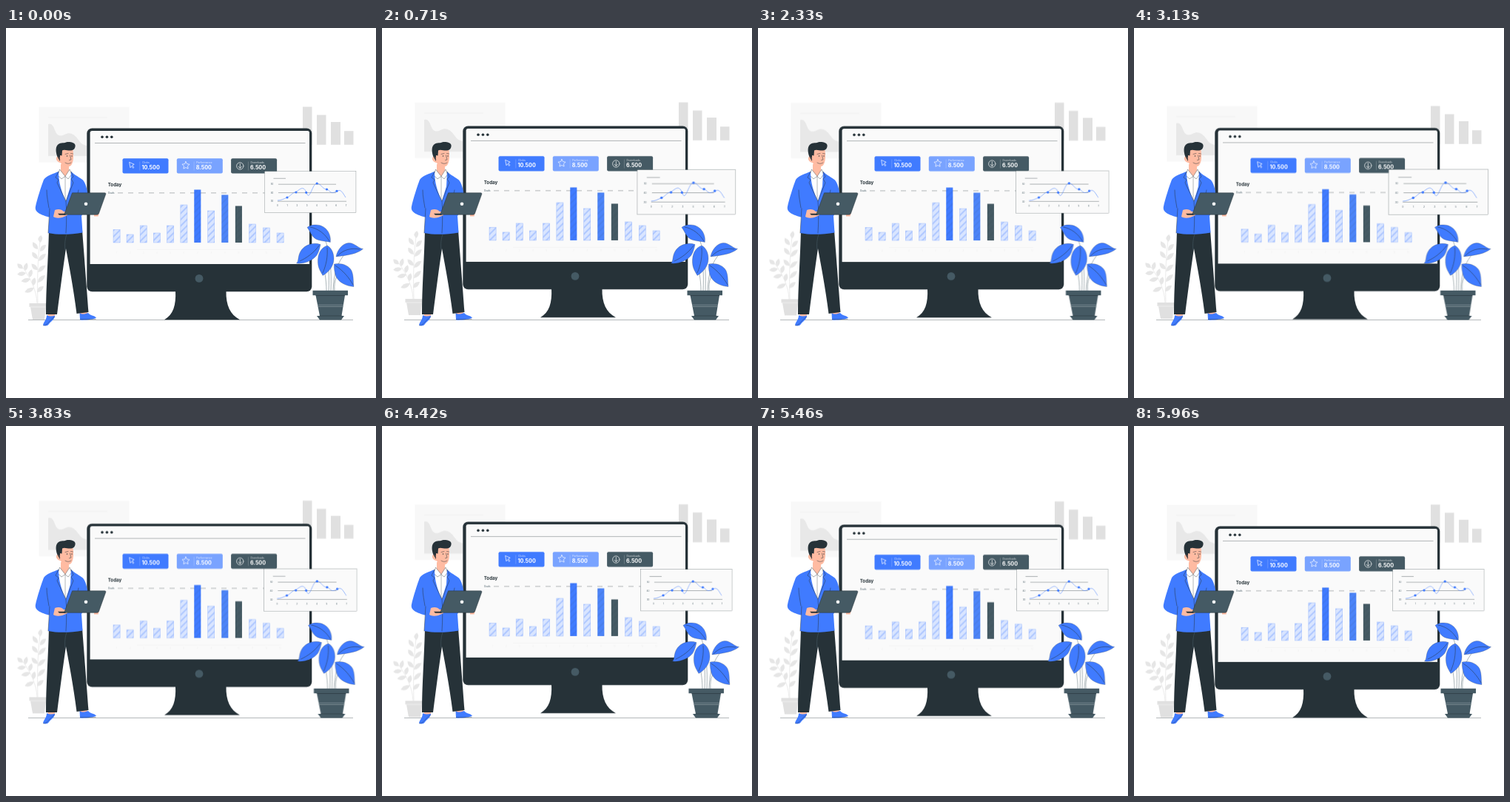
An HTML page for the animation above (6 s loop, 500 by 500 pixels).

```html
<!DOCTYPE html>
<html lang="en">
<head>
<meta charset="utf-8">
<title>Dashboard illustration</title>
<style>
html, body { margin: 0; width: 100%; height: 100%; overflow: hidden; background: #fff; }
svg { display: block; width: 100%; height: 100%; font-family: Inter, "Open Sans", sans-serif; }
.back { animation: rise 1.5s linear infinite; --lift: -6.3px; }
.monitor { animation: rise 3s linear infinite; --lift: -6.5px; }
.panel { animation: beat 1.5s infinite; transform-origin: 411.2px 221.7px; }
.plant { animation: shake 1.5s infinite; }
@keyframes rise { 50% { transform: translateY(var(--lift)); } }
@keyframes beat {
  0%, 40% { transform: scale(1); animation-timing-function: linear; }
  10%, 50% { transform: scale(1.1); animation-timing-function: ease; }
  30%, 60%, 100% { transform: scale(1); }
}
@keyframes shake {
  0%, 100% { transform: translateX(0); }
  10%, 90% { transform: translateX(-.55px); }
  20%, 80% { transform: translateX(1.1px); }
  30%, 50%, 70% { transform: translateX(-2.2px); }
  40%, 60% { transform: translateX(2.2px); }
}
.ink { fill: #263238; }
.slate { fill: #455a64; }
.blue { fill: #407bff; }
.skin { fill: #ffbba2; }
.line { fill: none; stroke: #263238; stroke-width: .5; stroke-linecap: round; stroke-linejoin: round; }
.thin { fill: none; stroke: #263238; stroke-width: .35; }
.white { fill: none; stroke: #fff; stroke-width: .7; stroke-linejoin: round; stroke-linecap: round; }
.num { font-weight: 700; font-size: 7.2px; fill: #fff; }
.tag { font-size: 3.5px; fill: #fff; fill-opacity: .8; }
</style>
</head>
<body>
<svg viewBox="0 0 500 500">
  <defs>
    <pattern id="hatch" width="6" height="6" patternUnits="userSpaceOnUse" patternTransform="rotate(45)">
      <path d="M2 0V6" stroke="#407bff" stroke-width=".55"/>
    </pattern>
    <pattern id="shade" width="6" height="6" patternUnits="userSpaceOnUse" patternTransform="rotate(45)">
      <path d="M2 0V6" stroke="#263238" stroke-opacity=".3" stroke-width=".45"/>
    </pattern>
  </defs>

  <g class="back">
    <rect x="44.500" y="106.700" width="122" height="75" fill="#f8f8f8"/>
    <path d="M57 121H137" stroke="#ececec" stroke-width=".7"/>
    <path d="M57 130C60 128 64 131 66 138C69 146 73 147 79 144C86 140 92 143 97 150C101 156 104 158 109 159V173H57Z" fill="#e8e8e8"/>
    <path d="M57 173H153" stroke="#efefef" stroke-width=".7"/>
    <g fill="#e0e0e0">
      <path d="M401 106.500H413.500V157.700H401ZM420 117.500H432.500V157.700H420ZM439 127H452V157.700H439ZM457 139.200H469.500V157.700H457Z"/>
      <path d="M31.500 372H55V377H31.500ZM33 377H54L52 394H36Z"/>
    </g>
    <path d="M32 377H55" stroke="#f2f2f2" stroke-width=".8"/>
    <g id="shrub" fill="#e6e6e6">
      <path d="M43 372C42 340 43 310 46 288M42 372C41 354 34 340 23 324" fill="none" stroke="#e6e6e6" stroke-width=".8"/>
    </g>
  </g>

  <path class="thin" d="M30 394.500H469"/>

  <g class="monitor">
    <path class="ink" d="M229 355C230 375 226 387 214 394.300H316C303 387 297 375 297.500 355Z"/>
    <rect class="ink" x="109.300" y="135.500" width="304" height="220.700" rx="7"/>
    <path d="M113.600 141.500Q113.600 139 116 139H407.500Q410 139 410 141.500V319H113.600Z" fill="#fafafa"/>
    <circle class="slate" cx="261" cy="338.400" r="5.400"/>
    <g class="ink"><circle cx="130" cy="147.300" r="1.800"/><circle cx="136.400" cy="147.300" r="1.800"/><circle cx="142.800" cy="147.300" r="1.800"/></g>
    <path class="thin" d="M120 155.500H404.500"/>
    <g id="cards"></g>
    <text x="137.700" y="213.800" font-size="6.200" font-weight="700" class="ink">Today</text>
    <text x="137.700" y="224.100" font-size="3.300" class="slate">Goals</text>
    <path class="thin" d="M151 222.900H372" stroke-dasharray="7 7"/>
    <path d="M177 299.500H372" stroke="#efefef" stroke-width=".5"/>
    <g id="bars"></g>
  </g>

  <g class="panel">
    <rect x="349.500" y="193.700" width="123.400" height="56" fill="#fafafa" stroke="#263238" stroke-opacity=".6" stroke-width=".4"/>
    <path class="thin" d="M361.500 203.300H378M368 211.200H446M368 222.600H446M367 234.200H460"/>
    <path d="M367 233C372 233 375 231 380 229C385 227 387 222 392 221.700C398 217 402 213 406 222.300C410 236 414 210 420 210C426 210 427 218 433.500 218C438 219 438 226 447 220.500C453 217 455 223 459 229" fill="none" stroke="#407bff" stroke-width=".5"/>
    <g id="dots" class="blue"></g>
    <g id="ticks" class="slate" font-size="2.800" text-anchor="middle"></g>
  </g>

  <g class="plant">
    <path d="M433 355C433 340 430 322 424 306M436 355C437 335 436 318 433 306M439 355C440 330 439 300 428 279M442 355C443 332 447 317 460 303M444 355C443 340 447 332 455 331" fill="none" stroke="#455a64" stroke-width=".45"/>
    <g fill="#407bff" stroke="#263238" stroke-width=".25">
      <path d="M438.300 289.500C440 277 431 265.500 418 266C412 266 409 268 407 269.500C411 274 413 284 422 286.500C428 288.500 434 288 438.300 289.500Z"/>
      <path d="M425 292.500C415 289 403 293 398 302C394 309 396 315 392.500 318C402 319 414 315 420 307C423 302 424 297 425 292.500Z"/>
      <path d="M434 294C425 297 421 306 421.500 317C422 326 426 330 428 334.500C436 330 443 322 443 312C443 304 440 297 434 294Z"/>
      <path d="M446 309C448 299 455 291 463 290.500C471 290 476 298 482.500 298.500C475 305 463 307 446 309Z"/>
      <path d="M443.500 319C452 317 463 320 467 328C470 335 469 342 470 349.500C460 349 450 344 446 336C444 330 443 325 443.500 319Z"/>
    </g>
    <path class="line" d="M411 269C422 271 431 278 437 288M397 315C406 311 416 304 423 294M428 331C433 320 435 308 434 297M448 308C456 299 467 297 478 299M445 321C456 328 464 338 469 347"/>
    <path class="slate" d="M414.500 354.700H462V361.300H414.500ZM418.500 361.300H458L453.500 389H424ZM420 389H457L453 394.500H424Z"/>
    <path d="M418.600 361.600H458" stroke="#263238" stroke-width=".6"/>
    <path d="M421 374.300H456M421.500 376.500H455.500" stroke="#a5b0b5" stroke-width=".5"/>
    <path class="line" d="M424 389H454"/>
  </g>

  <g class="man">
    <path class="skin" d="M57 384H67L65 392L56 394ZM99 381H109L111 390L101 391Z"/>
    <path class="blue" d="M55 388C59 390 63 390 66 388.500C66 394 61 396 58 400C56 403 52 403 50 401.500C51 397 55 394 55 388Z"/>
    <path class="blue" d="M99.500 385C103 388 108 386 111 385C114 389 119 388 122 391.500C120 394 104 395 100 394.500Z"/>
    <path class="thin" d="M50 402C57 402 58 395 66 390M100 393.500H121.500"/>
    <path class="ink" d="M58 273H103C105 300 109 350 111.500 384L95.500 386C91 350 85 320 81 298C77 325 73 355 69 387H54C54 350 57 315 58 273Z"/>
    <path d="M80 300C79 292 80 284 82 279" fill="none" stroke="#455a64" stroke-width=".6"/>

    <path d="M71 193L87 192L91 230L80 250L68 210Z" fill="#fff"/>
    <path class="skin" d="M74 184H85V192C85 196 83 200 80 201C76 199 74 196 74 193Z"/>
    <path d="M72.500 191L80 200.500L75 204L70 199ZM86 191L80 200.500L84 204L88.500 198Z" fill="#fff" stroke="#263238" stroke-width=".4"/>
    <path class="thin" d="M80 201V232"/>
    <path class="blue" d="M71 194C64 197 55 199 51 205C48 213 42 231 39.800 242C39 249 46 253 66 257.500L69 247L58.500 242L59 247L57 277C71 280 89 279 103.500 276.500L102 254L112 238C111 225 109 211 104 205.500C100 202 93 199 88 194L87 214L81 234C75 222 71 208 71 194Z"/>
    <path class="line" d="M71 194L67 202L71 205L69 209L81 234L91 209L88 204L91 201L88 194M55 219C55 228 57 236 58 243M59 244L57 277M81 234C82 247 82 262 81 277M98 219L96 228"/>
    <path class="skin" d="M66 246C71 244 75 245 78 248H83V253L76 256C71 257 67 257 64 255ZM119 249H126L124.500 254.500H119Z"/>
    <path d="M89.500 222.800H133.500Q135.300 222.800 134.800 224.500L125.500 250.500Q124.900 252.300 123 252.300H78.500Z" fill="#455a64" stroke="#263238" stroke-width=".5"/>
    <path class="ink" d="M70 250.700H79L81 252.800H72Z"/>
    <circle cx="108" cy="237.700" r="2.300" fill="#fff"/>

    <path class="skin" d="M71 166C76 162 85 162 90.500 165C91.500 173 91.500 181 88 185.500C84 189.500 77 187.500 73.500 182C68 181 66 175.500 70 173Z"/>
    <path class="ink" d="M73 180L69.500 174C67 168 67 162 69 159C72 154 78 156 81 154.500C85 153.500 92 154 93.500 158C94 162 92 165 88 165.500C83 166 79 163.500 76 165.500L75.500 172.500L73 172Z"/>
    <path class="line" d="M80 170.500L84 169.500M87.500 169.500L90.500 170M86.500 172L88 178L85.500 178.500M80 182C83 184 86 183.500 88 182"/>
    <circle class="ink" cx="82.500" cy="173" r=".7"/><circle class="ink" cx="89" cy="173" r=".7"/>
    <path d="M71 174Q73 175 73 178" fill="none" stroke="#d98772" stroke-width=".5"/>
  </g>
</svg>
<script>
const add = (id, html) => document.getElementById(id).insertAdjacentHTML('beforeend', html);

// Pale shrub: x, y, angle, length of each leaf
[[46, 290, -82, 10], [43, 299, -125, 12], [46, 302, -48, 12], [43, 312, -130, 12], [44, 315, -45, 14],
 [43, 327, -135, 12], [43, 330, -42, 14], [43, 344, -45, 14], [42, 357, -42, 12],
 [23, 325, -140, 10], [26, 328, -78, 11], [27, 331, 172, 12], [32, 337, -75, 11],
 [33, 339, 165, 13], [37, 348, -80, 11], [38, 351, 155, 14]]
  .forEach(([x, y, a, n]) => add('shrub',
    `<path d="M0 0Q${n * .5} -6.500 ${n} 0Q${n * .5} 5 0 0" transform="translate(${x} ${y}) rotate(${a})"/>`));

const icons = [
  'M167 181.500L173.200 184.300L170.700 185.500L172.800 188.500L171.700 189.400L169.700 186.600L168.200 188.500Z',
  'M243 180.500L244.600 183.700L248 184.200L245.500 186.700L246.100 190.100L243 188.500L239.900 190.100L240.500 186.700L238 184.200L241.400 183.700Z',
  'M321 186.500A4.700 4.700 0 1 1 311.600 186.500A4.700 4.700 0 1 1 321 186.500M316.300 183.500V189.300M314 187.200L316.300 189.500L318.600 187.200'
];
[['#407bff', 'Clicks', '10.500'], ['#79a3ff', 'Performance', '8.500'], ['#455a64', 'Downloads', '6.500']]
  .forEach(([color, label, value], i) => {
    const x = 157.5 + 73.3 * i;
    add('cards', `<rect x="${x}" y="176.200" width="62" height="20.400" rx="2" fill="${color}"/>
      <path class="white" d="${icons[i]}"/>
      <path d="M${x + 23.3} 180.500V192.500" stroke="#fff" stroke-opacity=".5" stroke-width=".4"/>
      <text class="tag" x="${x + 26.4}" y="183.300">${label}</text>
      <text class="num" x="${x + 26}" y="191.300">${value}</text>`);
  });

const solid = { 6: '#407bff', 8: '#4c84f8', 9: '#455a64' };
[17.5, 11, 23, 13, 23, 51, 71.5, 43, 64.5, 49.5, 25, 20, 13].forEach((h, i) => {
  const x = 145 + 18 * i + .035 * i * i;
  const box = `x="${x}" y="${290 - h}" width="9.100" height="${h}"`;
  add('bars', `<rect ${box} fill="${solid[i] || '#d9e5ff'}"/>
    <rect ${box} fill="url(#${solid[i] ? 'shade' : 'hatch'})"
      stroke="${solid[i] ? 'none' : '#8db0ff'}" stroke-width=".4"/>
    <text x="${x + 4.6}" y="305" font-size="3" text-anchor="middle" fill="#efefef">${i + 1}</text>`);
});

[[380, 229], [392, 222], [405.7, 222.3], [420.2, 210], [433.5, 218], [447, 220.3]]
  .forEach(([x, y]) => add('dots', `<circle cx="${x}" cy="${y}" r="1.600"/>`));
for (let i = 0; i < 8; i++) add('ticks', `<text x="${367 + 13.2 * i}" y="241">${i}</text>`);
[50, 40, 30].forEach((n, i) => add('ticks', `<text x="359.500" y="${212.3 + 11.5 * i}">${n}</text>`));
</script>
</body>
</html>
```
